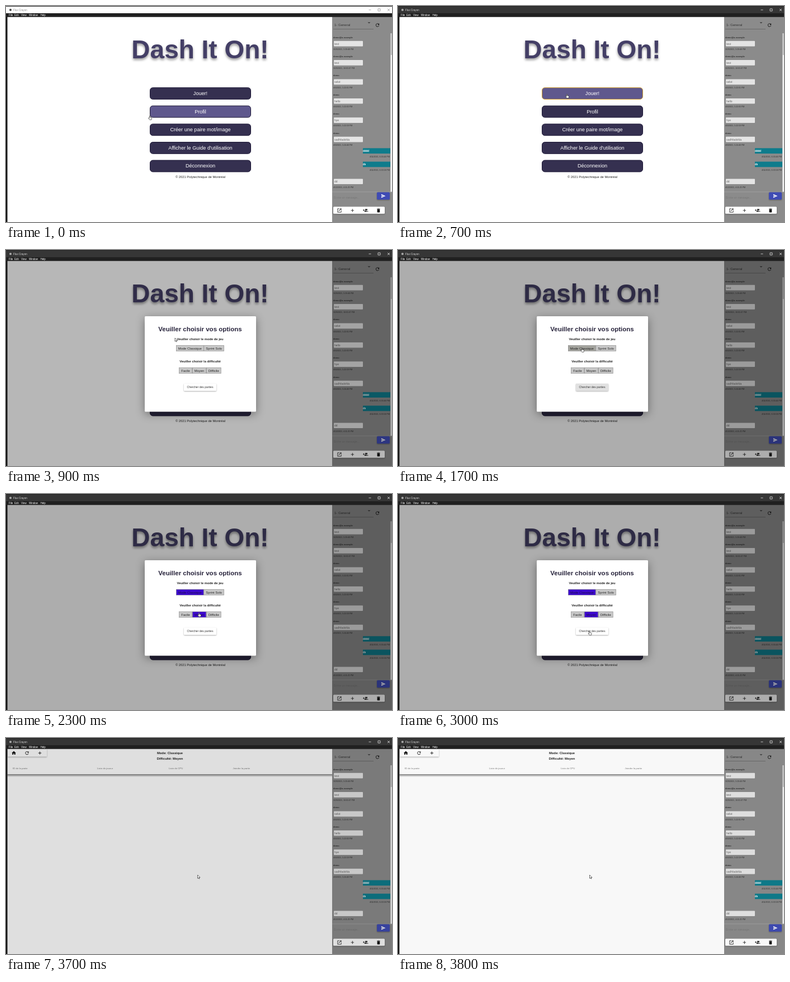
Write an HTML page that moves like this. It is 690 px wide and 388 px high and loops after 3900 ms.

```html
<!DOCTYPE html>
<html lang="fr">
<head>
<meta charset="utf-8">
<title>Menu de jeu</title>
<style>
  html, body { margin: 0; width: 100%; height: 100%; overflow: hidden; background: #111; }
  svg { display: block; width: 690px; height: 388px; }
  text { font-family: "Liberation Sans", Arial, sans-serif; white-space: pre; }
  .heading { filter: drop-shadow(0 3px 2px rgba(0, 0, 0, .4)); }
  .raised { filter: drop-shadow(0 1px .8px rgba(0, 0, 0, .32)); }
  .dialog { filter: drop-shadow(0 4px 8px rgba(0, 0, 0, .4)); }
</style>
</head>
<body>
<svg id="stage" viewBox="0 0 690 388" xmlns="http://www.w3.org/2000/svg"></svg>
<script>
const LOOP = 3900, STEP = 100;
const OPEN = 740, CLOSE = 3620, MODE_CLICK = 1800, LEVEL_CLICK = 2300;

const ICONS = {
  refresh: 'M17.65 6.35A8 8 0 1 0 19.73 14h-2.08A6 6 0 1 1 12 6c1.66 0 3.14.69 4.22 1.78L13 11h7V4z',
  open: 'M19 19H5V5h7V3H3v18h18v-9h-2zM14 3v2h3.6l-9.8 9.8 1.4 1.4L19 6.4V10h2V3z',
  add: 'M19 13h-6v6h-2v-6H5v-2h6V5h2v6h6z',
  people: 'M8 10H5V7H3v3H0v2h3v3h2v-3h3zM18 11a3 3 0 1 0 0-6a3 3 0 0 0 0 6zM13 11a3 3 0 1 0 0-6a3 3 0 0 0 0 6z' +
    'M13 13c-2 0-6 1-6 3v2h12v-2c0-2-4-3-6-3zM19.6 13.2c.8.7 1.4 1.6 1.4 2.8v2h3v-2c0-1.5-2.4-2.5-4.4-2.8z',
  trash: 'M6 19a2 2 0 0 0 2 2h8a2 2 0 0 0 2-2V7H6zM19 4h-3.5l-1-1h-5l-1 1H5v2h14z',
  send: 'M2 21l21-9L2 3v7l15 2-15 2z',
  home: 'M10 20v-6h4v6h5v-8h3L12 3 2 12h3v8z'
};

// Markup helpers; text is centred vertically on y.
const rect = (x, y, w, h, fill, more = '') =>
  `<rect x="${x}" y="${y}" width="${w}" height="${h}" fill="${fill}" ${more}/>`;
const text = (x, y, size, str, fill = '#222', more = '') =>
  `<text x="${x}" y="${y + size * .36}" font-size="${size}" fill="${fill}" ${more}>${str}</text>`;
const MID = 'text-anchor="middle"', END = 'text-anchor="end"', BOLD = 'font-weight="700"';
const icon = (name, x, y, fill = '#111', k = .39) =>
  `<path d="${ICONS[name]}" fill="${fill}" transform="translate(${x} ${y}) scale(${k}) translate(-12 -12)"/>`;

const menuButtons = ['Jouer!', 'Profil', 'Créer une paire mot/image', "Afficher le Guide d'utilisation", 'Déconnexion']
  .map((label, i) => ({ id: 'menu' + i, label, x: 257, y: 146.2 + i * 32.6, w: 181, h: 21.8 }));
const toggles = [
  { id: 'classic', label: 'Mode Classique', x: 304, y: 171, w: 49.5 },
  { id: 'sprint', label: 'Sprint Solo', x: 353.5, y: 171, w: 36.5 },
  { id: 'easy', label: 'Facile', x: 309, y: 211, w: 24 },
  { id: 'medium', label: 'Moyen', x: 333, y: 211, w: 25 },
  { id: 'hard', label: 'Difficile', x: 358, y: 211, w: 26.5 }
].map(b => ({ ...b, h: 11 }));
const searchButton = { id: 'search', x: 318, y: 240, w: 58, h: 13 };

function windowBar() {
  const menu = [['File', 5], ['Edit', 15], ['View', 27], ['Window', 41], ['Help', 61.5]];
  return rect(0, 0, 690, 13, '#363636', 'id="bar"') + rect(0, 0, 690, 1, '#222') +
    rect(0, 13, 690, 6.5, '#202020') +
    '<circle id="badge" cx="8" cy="7" r="2"/>' +
    text(13, 7, 4.6, 'Flux Crayon', '#ddd', 'id="caption"') +
    '<path id="controls" d="M648.5 7h4M665 5h4v4h-4zM682 5l4 4m0-4l-4 4" fill="none" stroke-width=".7"/>' +
    menu.map(([s, x]) => text(x, 16.3, 4.5, s, '#fff')).join('');
}

function homePage() {
  return rect(2.5, 19.5, 580.5, 368.5, '#fff') +
    text(347, 77.6, 46, 'Dash It On!', '#443f66', `${MID} ${BOLD} class="heading"`) +
    menuButtons.map(b => rect(b.x + .5, b.y + .5, b.w - 1, b.h - 1, '#353050', `id="${b.id}" rx="5"`) +
      text(347.5, b.y + 10.6, 9.1, b.label, '#fff', MID)).join('') +
    text(347.5, 307.3, 5.8, '© 2021 Polytechnique de Montréal', '#222', MID);
}

function lobbyPage() {
  const columns = [['ID de la partie', 12], ['Liste de joueur', 163], ['Liste de CPU', 291], ['Joindre la partie', 405.5]];
  return rect(2.5, 19.5, 580.5, 368.5, '#fff') +
    rect(3, 20, 70, 13.5, '#fff', 'class="raised"') +
    icon('home', 14, 27) + icon('refresh', 37.5, 27) + icon('add', 60.5, 27) +
    text(293, 27, 5.8, 'Mode: Classique', '#222', `${MID} ${BOLD}`) +
    text(293, 37.2, 5.8, 'Difficulté: Moyen', '#222', `${MID} ${BOLD}`) +
    columns.map(([s, x]) => text(x, 54, 4.3, s, '#777')).join('') +
    rect(2.5, 65, 580.5, 5, 'url(#fall)');
}

function chatPanel() {
  const received = [
    ['demo@a.example', 'test', '3/29/2021, 5:59:46 PM'],
    ['demo@a.example', 'test', '3/29/2021, 10:01:07 PM'],
    ['demo', 'salut', '4/3/2021, 5:22:01 PM'],
    ['demo', 'hello', '4/3/2021, 5:22:03 PM'],
    ['demo', 'hye', '4/3/2021, 5:22:59 PM'],
    ['demo', 'sadhfadsfda', '4/3/2021, 5:24:46 PM'],
    ['', 'dd', '4/12/2021, 4:11:25 PM']
  ];
  const sent = [['dddd', '4/11/2021, 6:33:44 PM'], ['ds', '4/11/2021, 6:33:58 PM']];
  let out = rect(583, 19.5, 107, 368.5, '#8b8b8b') +
    text(587, 34, 6, '1- General', '#333') + rect(585, 41, 72, .6, '#555') +
    '<path d="M646.5 29h5l-2.5 2.5z" fill="#444"/>' + icon('refresh', 664, 34.3) +
    rect(687.3, 49, 2.7, 285, '#f1f1f1') + rect(687.3, 49, 2.7, 39, '#c1c1c1');
  received.forEach(([who, msg, date], i) => {
    const y = i < 6 ? 56 + i * 34.4 : 303.7;
    out += text(585, y, 4.3, who, '#111') + rect(586, y + 6.7, 52, 9.7, '#e4e4e4', 'rx="1"') +
      text(587, y + 11.8, 5, msg, '#666') + text(585, y + 21.6, 3.6, date, '#2c2c2c');
  });
  sent.forEach(([msg, date], i) => {
    const y = 255.4 + i * 24.2;
    out += rect(638, y, 49, 9.7, '#0e7c8c') + text(638, y + 5, 4.5, msg, '#fff', BOLD) +
      text(686, y + 15.1, 3.6, date, '#2c2c2c', END);
  });
  out += rect(583, 333.6, 107, .7, '#a8a8a8') + text(586, 344, 5, 'Écrire un message...', '#787878') +
    rect(663, 334.5, 23, 13.2, '#3f4bb4', 'rx="1.5" class="raised"') + icon('send', 674.5, 341.2, '#fff', .36) +
    rect(585, 360.5, 92, 12.8, '#fff', 'rx="1.5" class="raised"');
  ['open', 'add', 'people', 'trash'].forEach((name, i) => out += icon(name, 596 + i * 23.3, 367.2));
  return out;
}

function optionsDialog() {
  const b = searchButton;
  return rect(248, 119, 199, 171.5, '#fff', 'rx="1.5" class="dialog"') +
    text(347, 142, 11.5, 'Veuiller choisir vos options', '#28243c', `${MID} ${BOLD}`) +
    text(347, 159.5, 5.8, 'Veuiller choisir le mode de jeu', '#222', `${MID} ${BOLD}`) +
    text(347, 199.6, 5.8, 'Veuiller choisir la difficulté', '#222', `${MID} ${BOLD}`) +
    toggles.map(t => rect(t.x + .3, t.y + .3, t.w - .6, t.h - .6, '#c8c8c8', `id="${t.id}" stroke="#858585" stroke-width=".6"`) +
      text(t.x + t.w / 2, t.y + 5.6, 5.9, t.label, '#222', `${MID} id="${t.id}Label"`)).join('') +
    rect(b.x, b.y, b.w, b.h, '#fff', 'id="search" rx="1" class="raised"') +
    text(347, 246.3, 5.05, 'Chercher des parties', '#333', MID);
}

document.getElementById('stage').innerHTML =
  '<defs><linearGradient id="fall" x2="0" y2="1"><stop stop-color="#000" stop-opacity=".5"/>' +
  '<stop offset="1" stop-color="#000" stop-opacity="0"/></linearGradient></defs>' +
  rect(0, 0, 690, 388, '#111') +
  `<g id="home">${homePage()}</g><g id="lobby">${lobbyPage()}</g>${chatPanel()}` +
  rect(2, 19.5, 688, 368.5, '#000', 'id="backdrop"') +
  `<g id="dialog">${optionsDialog()}</g>${windowBar()}` +
  '<g id="pointer" stroke="#111" stroke-width=".6" stroke-linejoin="round" fill="#fff">' +
  '<path id="arrow" d="M0 0v6.2l1.5-1.3 1 2.1 1-.5-1-2H4.5z"/>' +
  '<path id="hand" d="M-.7.6q.7-1.2 1.4 0v2.4l2.3.6q.7.3.6 1.1L3 7.4H-.3L-2.4 4.6q0-1 .9-.7l.8.7z"/></g>';

const $ = id => document.getElementById(id);
const set = (id, attrs) => { for (const k in attrs) $(id).setAttribute(k, attrs[k]); };
const show = (id, on) => set(id, { display: on ? 'inline' : 'none' });
const clamp = v => Math.min(1, Math.max(0, v));
const smooth = v => v * v * (3 - 2 * v);

// CSS-style cubic bezier, solved by bisection.
function bezier(x1, y1, x2, y2, x) {
  const at = (a, b, s) => 3 * (1 - s) ** 2 * s * a + 3 * (1 - s) * s * s * b + s ** 3;
  let lo = 0, hi = 1;
  for (let i = 0; i < 20; i++) {
    const mid = (lo + hi) / 2;
    if (at(x1, x2, mid) < x) lo = mid; else hi = mid;
  }
  return at(y1, y2, lo);
}
const fade = (t, start) => bezier(.25, .8, .25, 1, clamp((t - start) / 400));

const start = { x: 257, y: 197 };
const moves = [
  { from: 0, to: 550, x: 302, y: 158 },
  { from: 1200, to: 1650, x: 329, y: 176 },
  { from: 1850, to: 2250, x: 345, y: 213 },
  { from: 2400, to: 2950, x: 342.5, y: 246 }
];
function pointerAt(t) {
  let { x, y } = start;
  for (const m of moves) {
    const p = smooth(clamp((t - m.from) / (m.to - m.from)));
    x += (m.x - x) * p;
    y += (m.y - y) * p;
  }
  return { x, y };
}
const inside = (p, b) => p.x >= b.x && p.x <= b.x + b.w && p.y >= b.y && p.y <= b.y + b.h;

function draw(t) {
  const focused = t >= 700, inLobby = t >= CLOSE, hasDialog = t >= OPEN && t < CLOSE + 75;
  const p = pointerAt(t);
  const targets = inLobby ? [] : hasDialog ? [...toggles, searchButton] : menuButtons;
  const over = (targets.find(b => inside(p, b)) || {}).id;

  set('bar', { fill: focused ? '#363636' : '#fff' });
  set('badge', { fill: focused ? '#aaa' : '#444' });
  set('caption', { fill: focused ? '#ddd' : '#888' });
  set('controls', { stroke: focused ? '#fff' : '#888' });

  show('home', !inLobby);
  show('lobby', inLobby);
  menuButtons.forEach((b, i) => {
    const ring = i === 0 && focused && !hasDialog;
    set(b.id, { fill: over === b.id ? '#5f588d' : '#353050', stroke: ring ? '#d6a02c' : '#1d1836' });
  });

  set('backdrop', { opacity: .32 * (fade(t, OPEN) - fade(t, CLOSE)) });
  const grow = bezier(0, 0, .2, 1, clamp((t - OPEN) / 150));
  const scale = .7 + .3 * grow;
  show('dialog', hasDialog);
  set('dialog', {
    opacity: grow * (1 - clamp((t - CLOSE) / 75)),
    transform: `translate(347.5 205) scale(${scale}) translate(-347.5 -205)`
  });
  toggles.forEach(({ id }) => {
    const on = id === 'classic' && t >= MODE_CLICK || id === 'medium' && t >= LEVEL_CLICK;
    set(id, { fill: on ? '#3d08cf' : over === id ? '#a4a49e' : '#c8c8c8' });
    set(id + 'Label', { fill: on ? '#1d1048' : '#222' });
  });
  const searchFocus = t >= 1000 && t < MODE_CLICK || t >= 3400;
  set('search', { fill: searchFocus ? '#e1e1e1' : '#fff' });

  set('pointer', { transform: `translate(${p.x} ${p.y})` });
  show('hand', over);
  show('arrow', !over);
}

const origin = performance.now();
function tick() {
  const t = (performance.now() - origin) % LOOP;
  draw(Math.floor(t / STEP) * STEP);
  requestAnimationFrame(tick);
}
tick();
</script>
</body>
</html>
```
